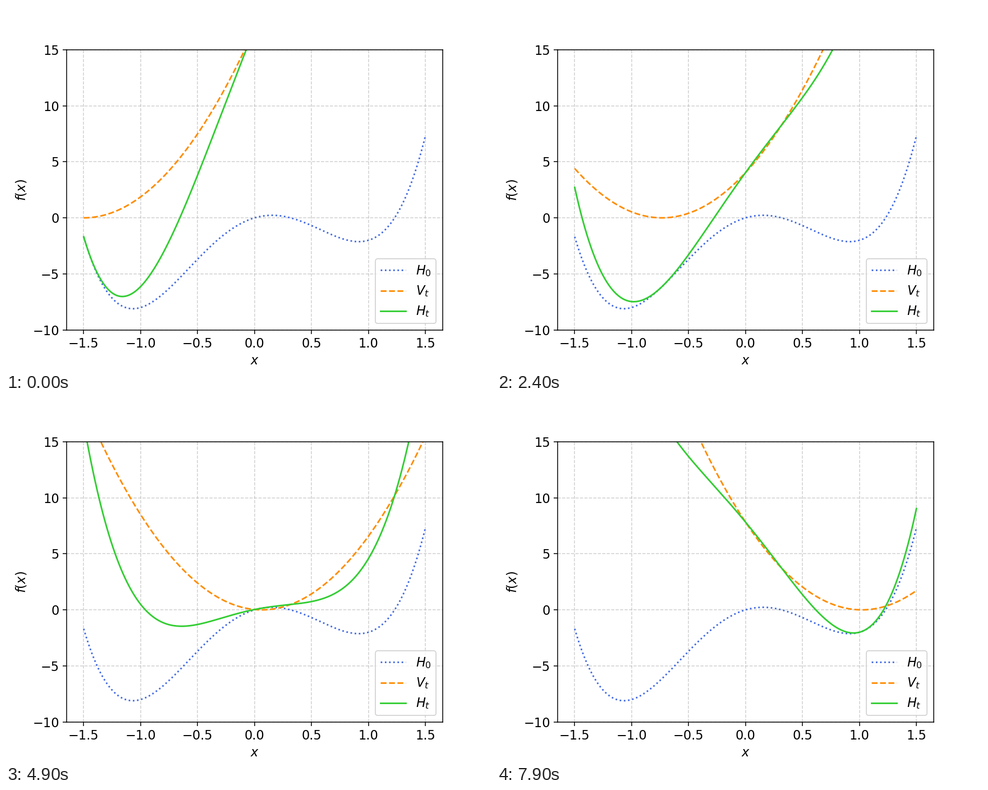
These frames come from a looping animation (864x648 px, 8 s). A matplotlib script:

```python
import numpy as np
import matplotlib.pyplot as plt
from matplotlib.animation import FuncAnimation

FRAMES = 80
START, STEP = -1.5, 3 / 94   # trap centre and its shift per frame
STIFFNESS = 15

plt.rcParams["font.family"] = "DejaVu Sans"
plt.rcParams["font.size"] = 12


def potential(x):
    return 5 * x**4 - 10 * x**2 + 3 * x


def trap(x, centre):
    return STIFFNESS / 2 * (x - centre) ** 2


x = np.linspace(-1.5, 1.5, 200)
h0 = potential(x)

fig, ax = plt.subplots(figsize=(6.4, 4.8), dpi=135)
ax.plot(x, h0, ":", color="royalblue", label="$H_0$")
trap_line, = ax.plot(x, trap(x, START), "--", color="darkorange", label="$V_t$")
total_line, = ax.plot(x, h0 + trap(x, START), color="limegreen", label="$H_t$")

ax.set_xlim(-1.65, 1.65)
ax.set_ylim(-10, 15)
ax.set_xticks(np.arange(-1.5, 1.6, 0.5))
ax.set_yticks(range(-10, 16, 5))
ax.set_xlabel("$x$")
ax.set_ylabel("$f(x)$")
ax.grid(linestyle="--", alpha=0.6)
ax.legend(loc="lower right")


def update(i):
    v = trap(x, START + STEP * i)
    trap_line.set_ydata(v)
    total_line.set_ydata(h0 + v)
    return trap_line, total_line


anim = FuncAnimation(fig, update, frames=FRAMES, interval=100, repeat=True)
plt.show()
```
